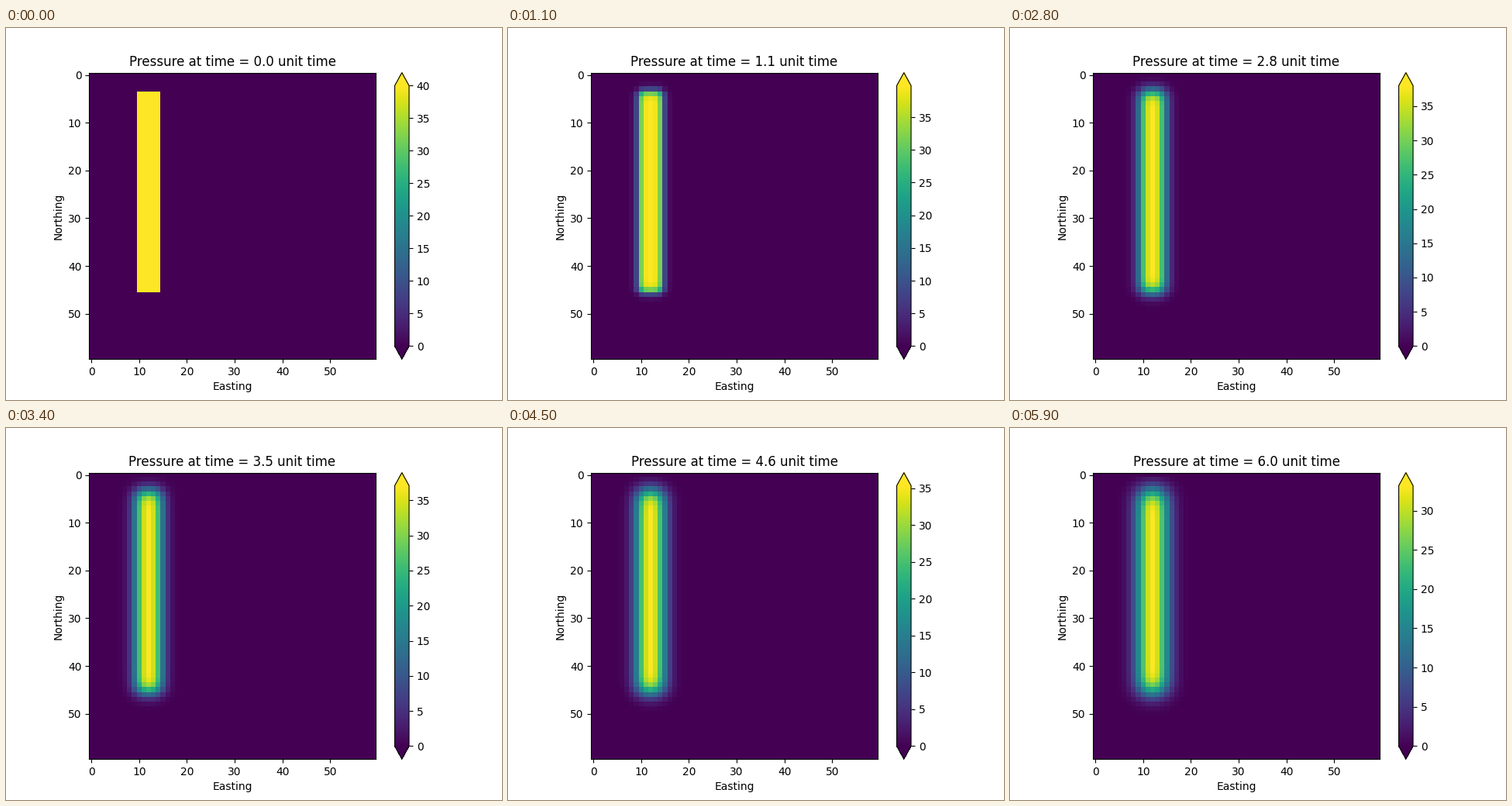
These frames come from a looping animation (640 by 480 pixels, 6000 ms). A matplotlib script:

```python
import numpy as np
import matplotlib.pyplot as plt
from matplotlib.animation import FuncAnimation

FRAMES = 60
INTERVAL = 100          # ms
SIZE = 60               # cells per side
END_TIME = 6.0
RATE = 0.3 * 0.1        # diffusivity * time step / cell area


def diffuse(p):
    """One explicit step; the border cells stay fixed at zero."""
    new = p.copy()
    new[1:-1, 1:-1] += RATE * (p[2:, 1:-1] + p[:-2, 1:-1] + p[1:-1, 2:]
                               + p[1:-1, :-2] - 4 * p[1:-1, 1:-1])
    return new


def simulate():
    p = np.zeros((SIZE, SIZE))
    p[4:46, 10:15] = 40
    # The first interval only settles the initial state.
    fields = [p, p]
    while len(fields) < FRAMES:
        fields.append(diffuse(fields[-1]))
    return fields


fields = simulate()
times = np.linspace(0, END_TIME, FRAMES)

fig, ax = plt.subplots(figsize=(6.4, 4.8), dpi=100)
image = ax.imshow(fields[0], cmap="viridis", vmin=0, vmax=40)
fig.colorbar(image, ax=ax, extend="both")
ax.set_xlabel("Easting")
ax.set_ylabel("Northing")
title = ax.set_title("")


def draw(i):
    image.set_data(fields[i])
    image.set_clim(0, fields[i].max())
    title.set_text(f"Pressure at time = {times[i]:.1f} unit time")
    return image, title


anim = FuncAnimation(fig, draw, frames=FRAMES, interval=INTERVAL,
                     init_func=lambda: draw(0), repeat=True, repeat_delay=0)
plt.show()
```
